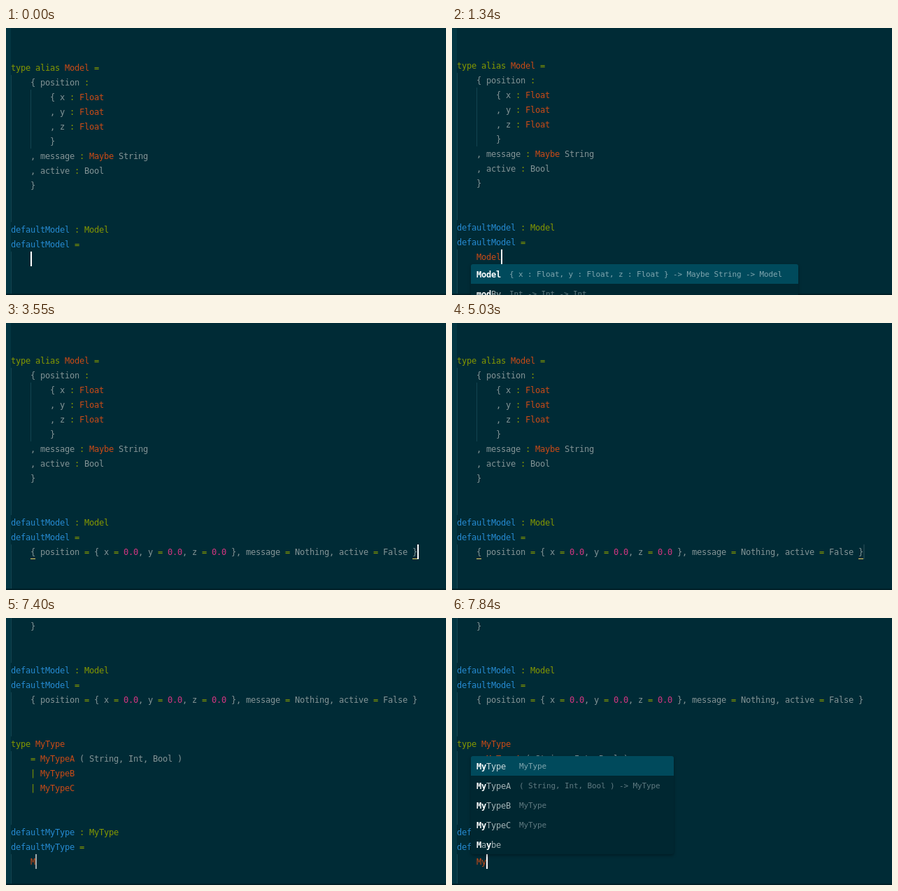
Write an HTML page with a canvas that moves like this. It is 629 by 381 pixels and loops after 7990 ms.

```html
<!DOCTYPE html>
<html lang="en">
<head>
<meta charset="utf-8">
<title>Code completion</title>
<style>
html, body { margin: 0; width: 100%; height: 100%; overflow: hidden; background: #002b36; }
canvas { display: block; }
</style>
</head>
<body>
<canvas id="stage" width="629" height="381"></canvas>
<script>
const ctx = document.getElementById("stage").getContext("2d");
const LOOP = 7990, TICK = LOOP / 54;
const LEFT = 7, CELL = 7, LINE = 21;
const MONO = '"DejaVu Sans Mono", "Liberation Mono", monospace';
const GREY = "#839496", GREEN = "#859900", ORANGE = "#cb4b16", BLUE = "#268bd2", PINK = "#d33682";

const code = `type alias Model =
    { position :
        { x : Float
        , y : Float
        , z : Float
        }
    , message : Maybe String
    , active : Bool
    }


defaultModel : Model
defaultModel =



type MyType
    = MyTypeA ( String, Int, Bool )
    | MyTypeB
    | MyTypeC


defaultMyType : MyType
defaultMyType =

`.split("\n");
const MODEL_ROW = 13, TYPE_ROW = 24, LAST_ROW = 25;
const record = "{ position = { x = 0.0, y = 0.0, z = 0.0 }, message = Nothing, active = False }";

// Each step table holds [first tick, value].
const modelText = [[0, ""], [6, "M"], [7, "Mo"], [8, "Mod"], [9, "Model"], [10, "Model "], [22, record]];
const typeText = [[0, ""], [50, "M"], [53, "My"]];
const cursorRow = [[0, 13], [36, 15], [37, 17], [38, 20], [39, 23], [40, 25], [43, 24]];
const blinkStart = [[0, 100], [6, LOOP], [10, 1900], [22, 3950], [36, LOOP], [44, 6850], [51, LOOP]];
// Guides: [column, first row, last row]
const guides = [[0, 1, 10], [4, 2, 5], [0, 13, 15], [0, 17, 21], [0, 24, 25]];

const modelDetail = "{ x : Float, y : Float, z : Float } -> Maybe String -> Model";
const typeItems = [
  ["MyType", "MyType"],
  ["MyTypeA", "( String, Int, Bool ) -> MyType"],
  ["MyTypeB", "MyType"],
  ["MyTypeC", "MyType"],
  ["Maybe", ""]
];

const at = (steps, tick) => steps.filter(([from]) => from <= tick).pop()[1];

function rect(x, y, w, h, color) {
  ctx.fillStyle = color;
  ctx.fillRect(x, y, w, h);
}

function text(string, x, y, color, style = "", size = 12, cell = CELL) {
  ctx.font = `${style} ${size}px ${MONO}`;
  ctx.letterSpacing = "0px";
  ctx.letterSpacing = cell - ctx.measureText("M").width + "px";
  ctx.fillStyle = color;
  ctx.fillText(string, x, y);
}

const detail = (string, x, y, color, style) => text(string, x, y, color, style, 11, 6.5);

function tokenColor(token, line) {
  if (/^\d/.test(token)) return PINK;
  if (/^default/.test(token)) return BLUE;
  if (/^([=:|]|type|alias)$/.test(token)) return GREEN;
  if (/^(M|Float)/.test(token)) return line.startsWith("default") ? GREEN : ORANGE;
  return GREY;
}

function codeLine(line, y) {
  for (const m of line.matchAll(/\d+\.\d+|\w+|[^\s\w]/g))
    text(m[0], LEFT + m.index * CELL, y + 15, tokenColor(m[0], line));
}

function panel(x, y, w, h, color) {
  ctx.save();
  ctx.shadowColor = "rgba(0,0,0,.35)";
  ctx.shadowBlur = 4;
  ctx.shadowOffsetY = 2;
  ctx.fillStyle = color;
  ctx.beginPath();
  ctx.roundRect(x, y, w, h, 3);
  ctx.fill();
  ctx.restore();
}

function completions(items, typed, y, width) {
  const x = 27, row = 28;
  const detailX = x + 20 + CELL * Math.max(...items.map(([name]) => name.length));
  panel(x, y, width, items.length * row, "#002731");
  items.forEach(([name, info], i) => {
    const top = y + i * row;
    if (!i) {
      ctx.fillStyle = "#004a5c";
      ctx.beginPath();
      ctx.roundRect(x, top, width, row, [3, 3, 0, 0]);
      ctx.fill();
    }
    let matched = 0;
    [...name].forEach((char, k) => {
      const hit = char.toLowerCase() === (typed[matched] || "").toLowerCase();
      if (hit) matched++;
      text(char, x + 8 + k * CELL, top + 19, hit ? "#fff" : i ? "#a3b3b5" : "#c9dadd", hit ? "bold" : "");
    });
    detail(info, detailX, top + 18, i ? "#5f7a81" : "#7fa5ae");
  });
}

function replacement() {
  panel(34, 337, 518, 28, "#004a5c");
  text("{ position = { x = 0.0, y = 0.0, z = 0.0 …", 42, 356, "#d3e3e5");
  ctx.fillStyle = "#8fa9ae";
  ctx.fill(new Path2D("M366 343L359 351H363L360 357L369 348H365Z"));
  detail("Replace type with default", 375, 355, "#7fa5ae", "italic");
}

function cursorAlpha(time, start) {
  const since = time - start;
  if (since < 0) return 1;
  const fade = (1 - (since % 400) / 400) ** 2;
  return Math.floor(since / 400) % 2 ? 1 - fade : fade;
}

function draw(now) {
  const tick = Math.floor((now % LOOP) / TICK + 0.07) % 54;
  const row = at(cursorRow, tick);
  const top = tick < 6 ? 46 : Math.min(43, 358 - LINE * (tick >= 43 ? LAST_ROW : row));
  const rowY = n => top + n * LINE;

  const lines = [...code];
  lines[MODEL_ROW] = "    " + at(modelText, tick);
  lines[TYPE_ROW] = tick < 44 ? "" : "    " + at(typeText, tick);

  rect(0, 0, 629, 381, "#002b36");
  rect(0, 0, LEFT, 381, "#033541");
  for (const [col, first, last] of guides)
    rect(LEFT + col * CELL, rowY(first), 1, (last - first + 1) * LINE, "#134450");
  lines.forEach((line, i) => codeLine(line, rowY(i)));

  if (tick >= 23 && tick < 36)
    for (const col of [4, 82]) rect(LEFT + col * CELL, rowY(MODEL_ROW) + 20, CELL, 1, "#f0d264");

  ctx.globalAlpha = cursorAlpha(tick * TICK, at(blinkStart, tick));
  rect(LEFT + lines[row].length * CELL, rowY(row), 2, LINE, "#fff");
  ctx.globalAlpha = 1;
  rect(0, 379, 629, 2, "#001f27");

  if (tick === 8 || tick === 9)
    completions([["Model", modelDetail], ["modBy", "Int -> Int -> Int"]], at(modelText, tick), 337, 468);
  if (tick >= 10 && tick < 22) replacement();
  if (tick === 52) completions([...typeItems, ["Model", modelDetail]], "M", 169, 482);
  if (tick === 53) completions(typeItems, "My", 197, 290);
}

const begin = performance.now();
function frame() {
  draw(performance.now() - begin);
  requestAnimationFrame(frame);
}
frame();
</script>
</body>
</html>
```
